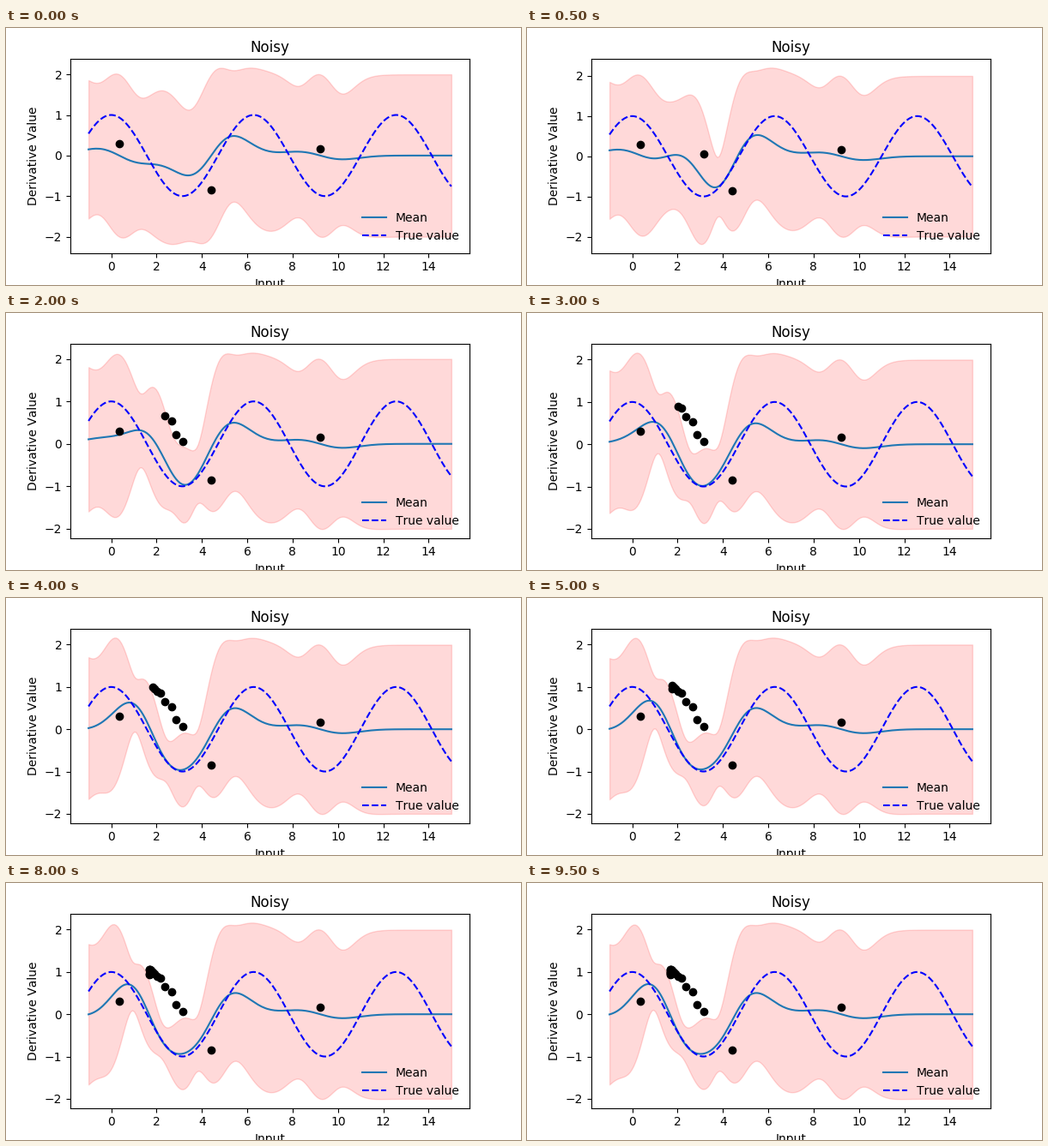
Recreate the animation shown at these times as a matplotlib script. Size 600 by 300 pixels, loop 10 s.

```python
import numpy as np
import matplotlib.pyplot as plt
from matplotlib.animation import FuncAnimation

plt.rcParams["font.family"] = "DejaVu Sans"
plt.rcParams["text.kerning_factor"] = 6

FRAMES, INTERVAL = 20, 500
NOISE = 0.07         # observation noise variance
STEP = 0.5           # ascent rate along the estimated slope
START = 3.157

grid = np.linspace(-1, 15, 200)


def kernel(a, b):
    gap = a[:, None] - b[None, :]
    return gap, np.exp(-gap**2 / 2)


def slope_posterior(at, x, y):
    """Mean and deviation of the derivative of a Gaussian process."""
    cov = kernel(x, x)[1] + NOISE * np.eye(len(x))
    gap, value = kernel(at, x)
    cross = -gap * value
    weights = np.linalg.solve(cov, cross.T).T
    var = 1 - np.sum(cross * weights, axis=1)
    return weights @ y, np.sqrt(np.maximum(var, 0))


def observe(x, k):
    """Sine value with a small deterministic measurement error."""
    return np.sin(x) + 0.01 + 0.06 * np.cos(3.4 * k)


def climb(count):
    """Samples gathered while following the estimated slope uphill."""
    x = np.array([0.356, 4.41, 9.215])
    y = np.array([0.30, -0.85, 0.165])
    position = START
    for k in range(count):
        x = np.append(x, position)
        y = np.append(y, observe(position, k))
        slope, _ = slope_posterior(np.array([position]), x, y)
        position += STEP * slope[0]
    return x, y


fig, ax = plt.subplots(figsize=(6, 3), dpi=100)
fig.subplots_adjust(left=0.125, right=0.9, bottom=0.125, top=0.88)


def draw(frame):
    ax.clear()
    x, y = climb(frame)
    mean, dev = slope_posterior(grid, x, y)
    ax.fill_between(grid, mean - 2 * dev, mean + 2 * dev,
                    color="red", alpha=0.15)
    ax.plot(grid, mean, color="C0", label="Mean")
    ax.plot(grid, np.cos(grid), "b--", label="True value")
    ax.plot(x, y, "ko")
    ax.set_xticks(range(0, 15, 2))
    ax.set_yticks(range(-2, 3))
    ax.set_title("Noisy")
    ax.set_xlabel("Input")
    ax.set_ylabel("Derivative Value")
    ax.legend(loc="lower right", frameon=False)
    return ax.get_children()


anim = FuncAnimation(fig, draw, frames=FRAMES, interval=INTERVAL,
                     init_func=lambda: draw(0), repeat=True, repeat_delay=0)
plt.show()
```
